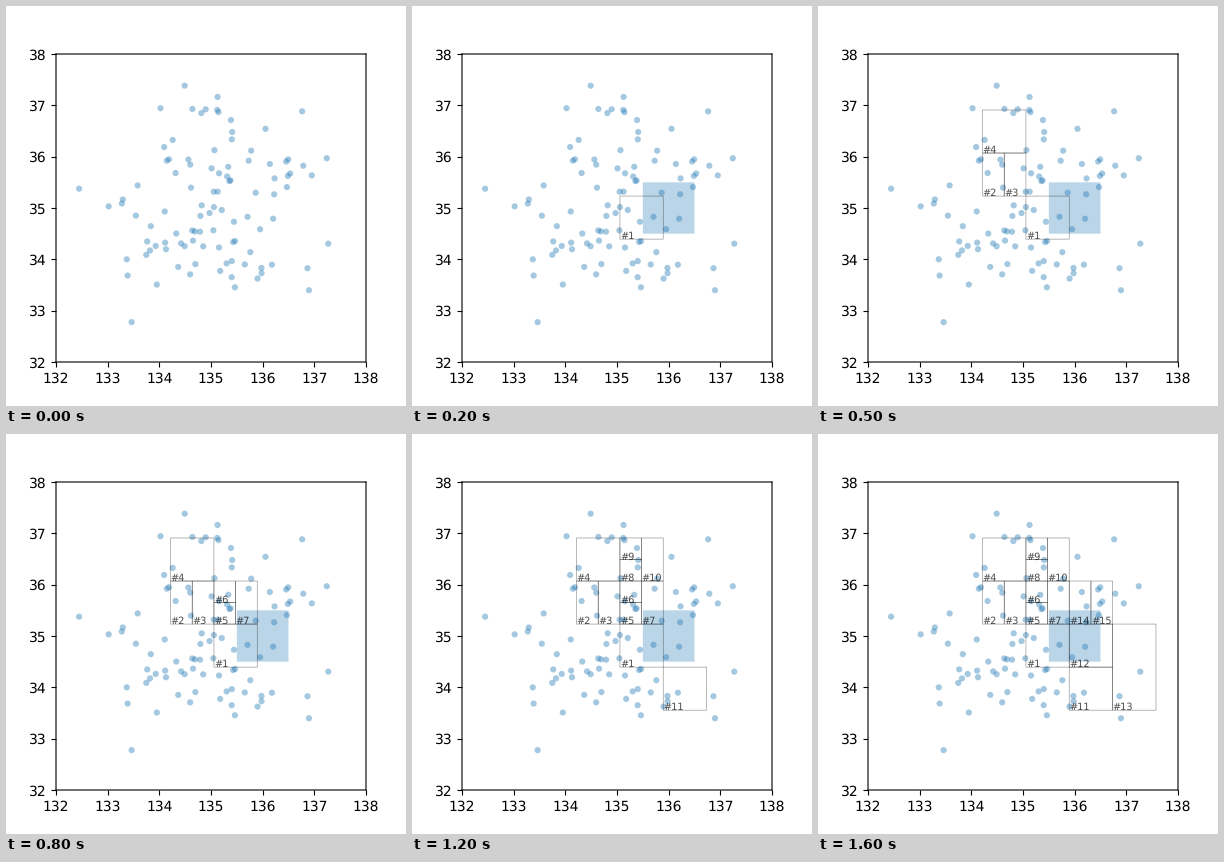
These frames come from a looping animation (400x400 px, 1700 ms). A matplotlib script:

```python
import numpy as np
import matplotlib.pyplot as plt
from matplotlib.animation import FuncAnimation
from matplotlib.patches import Rectangle

plt.rcParams["path.snap"] = False
plt.rcParams["text.hinting"] = "none"

BLUE = "#1f77b4"
UNIT = 2**22 * 1e-7   # smallest cell: coordinates are stored as integers * 1e7
CAPACITY = 5          # points a cell may hold before it is split
MARGIN = 1e-3         # points this close to an edge count as inside
LOW, HIGH = (135.5, 34.5), (136.5, 35.5)  # corners of the query square

np.random.seed(0)
xs = 135 + np.random.randn(100)
ys = 35 + np.random.randn(100)


def inside(px, py, cell, margin=0):
    x, y, w, h = (v * UNIT for v in cell)
    return ((px >= x - margin) & (px < x + w + margin)
            & (py >= y - margin) & (py < y + h + margin))


def leaves(cell):
    """Halve a cell along x and y in turn; yield full-grown cells in Z-order."""
    x, y, w, h = cell
    if inside(xs, ys, cell, MARGIN).sum() <= CAPACITY:
        yield cell
    elif w >= h:
        yield from leaves((x, y, w / 2, h))
        yield from leaves((x + w / 2, y, w / 2, h))
    else:
        yield from leaves((x, y, w, h / 2))
        yield from leaves((x, y + h / 2, w, h / 2))


# The scan runs from the cell of the low corner to that of the high corner.
tree = list(leaves((320, 80, 8, 8)))
first, last = (next(i for i, c in enumerate(tree) if inside(*corner, c))
               for corner in (LOW, HIGH))
scan = tree[first:last + 1]

fig, ax = plt.subplots(figsize=(4, 4), dpi=100)
ax.set_xlim(132, 138)
ax.set_ylim(32, 38)
ax.set_xticks(range(132, 139))
ax.set_yticks(range(32, 39))
# One size per dot keeps the dots at subpixel positions.
ax.scatter(xs, ys, s=np.full(len(xs), 20), color=BLUE, alpha=0.4, linewidths=0)

query = ax.add_patch(Rectangle(LOW, HIGH[0] - LOW[0], HIGH[1] - LOW[1],
                               facecolor=BLUE, alpha=0.3, linewidth=0))


def add_cell(number, cell):
    x, y, w, h = (v * UNIT for v in cell)
    box = ax.add_patch(Rectangle((x, y), w, h, fill=False, edgecolor="black",
                                 linewidth=0.5, alpha=0.4))
    label = ax.text(x, y, f"#{number}", fontsize=7, alpha=0.7)
    return box, label


cells = [add_cell(i, c) for i, c in enumerate(scan, 1)]


def update(frame):
    """Show the query square first, then one more cell per frame."""
    query.set_visible(frame >= 1)
    for i, parts in enumerate(cells):
        for part in parts:
            part.set_visible(frame >= i + 2)
    return []


anim = FuncAnimation(fig, update, frames=len(scan) + 2, interval=100,
                     repeat=True, repeat_delay=0)
plt.show()
```
